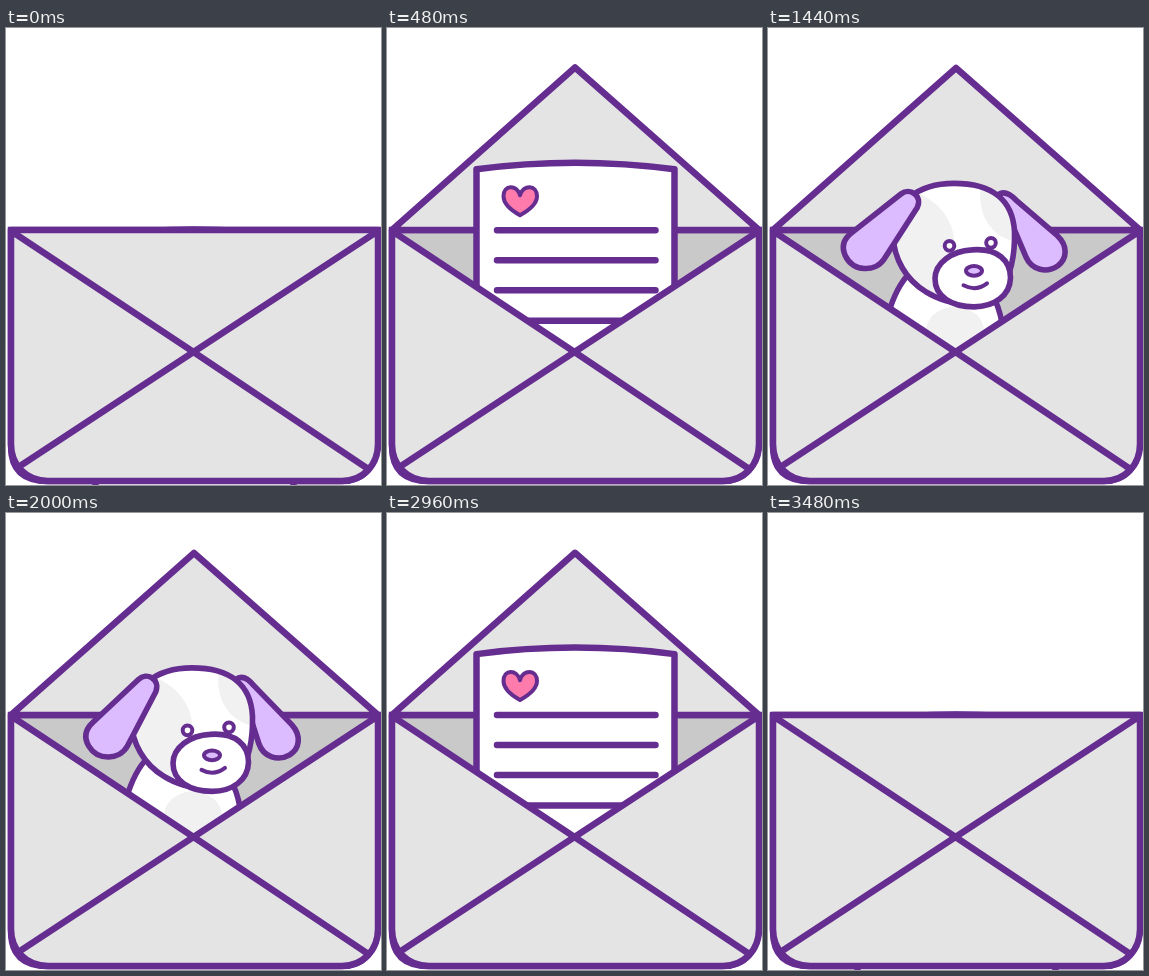
Animation of 375 by 457 pixels, one loop 3520 ms. Source, as an HTML page:

```html
<!DOCTYPE html>
<html lang="en">
<head>
<meta charset="utf-8">
<title>Letter and puppy</title>
<style>
  html, body { margin: 0; width: 100%; height: 100%; overflow: hidden; background: #fff; }
  svg { display: block; width: 100%; height: 100%; }
  .line { stroke: #662d91; stroke-width: 6.5; stroke-linecap: round; stroke-linejoin: round; }
  .dog { stroke-width: 5.6; }
  .thin { stroke-width: 4; }
  .grey { fill: #e4e4e4; }
  .white { fill: #fff; }
  .patch { fill: #f1f1f1; }
  .lilac { fill: #dcbcff; }
  .none { fill: none; }
</style>
</head>
<body>
<svg viewBox="0 0 375 457">
  <defs>
    <path id="headShape" d="M186 154.500C224 154.500 245 171 246.500 203C247 222 244 244 233 262L204 276C188 275 172 272 158 263C138 251 126 230 125 207C124 174 150 154.500 186 154.500Z"/>
    <path id="bodyShape" d="M108 350C115 300 122 264 142 244L224 266C233 280 237 300 238 350Z"/>
    <clipPath id="headClip"><use href="#headShape"/></clipPath>
    <clipPath id="bodyClip"><use href="#bodyShape"/></clipPath>
  </defs>
  <g id="scene">
    <path d="M5 202H372V418Q366 453 335 453H42Q5 453 5 418Z" fill="#c9c9c9" class="line" style="stroke-linejoin:miter"/>
    <path id="flap" class="line grey"/>
    <g id="letter">
      <path class="line white" d="M89.500 141Q188 128 287.500 141V400H89.500Z"/>
      <path class="line none" stroke-width="7" d="M110 202H268.500M110 232H268.500M110 262H268.500M110 292.500H268.500"/>
      <path class="line thin" fill="#ff7bac" d="M133 187C124 182 116.500 176 116.500 168C116.500 156 130 156 133 167C136 156 150 156 150 168C150 176 142 182 133 187Z"/>
    </g>
    <g id="dog">
      <use href="#bodyShape" class="line dog white"/>
      <ellipse class="patch" cx="187" cy="302" rx="29" ry="24" clip-path="url(#bodyClip)"/>
      <path id="earR" class="line dog lilac" d="M229 167C235 161 242 165 248 171L290 206C301 216 300 229 291 236C280 244 265 241 259 228L243 192Z"/>
      <use href="#headShape" class="white"/>
      <g class="patch" clip-path="url(#headClip)">
        <path d="M120 150L146 163C170 171 188 193 186 217L164 250L172 280H110Z"/>
        <path d="M214 150C208 178 216 206 250 214V150Z"/>
      </g>
      <use href="#headShape" class="line dog none"/>
      <path class="line dog white" d="M204 221C230 219 242.500 232 242.500 249C242 267 226 278 206 278C184 278 167 268 167 250C167 234 184 222 204 221Z"/>
      <g class="line thin white">
        <circle cx="181.500" cy="217" r="4.800"/>
        <circle cx="223" cy="214" r="4.800"/>
        <ellipse class="lilac" cx="206" cy="242" rx="8" ry="4.800"/>
        <path class="none" d="M195.500 256.500Q208 263 219 254.500"/>
      </g>
      <path id="earL" class="line dog lilac" d="M133 165C142 158 155 167 149 179L115 230C106 243 84 242 76.500 226C72 216 75 209 83 203Z"/>
    </g>
    <path class="line grey" d="M5 203L187.500 324L372 203V416C372 437 357 453 336 453H42C20 453 5 437 5 416Z"/>
    <path class="line none" d="M187.500 324L360 439.500M187.500 324L14 438"/>
  </g>
</svg>
<script>
const LOOP = 3520, STEP = 40;
const [scene, flap, letter, dog, earL, earR] =
  ["scene", "flap", "letter", "dog", "earL", "earR"].map(id => document.getElementById(id));

const clamp = x => Math.min(1, Math.max(0, x));
const expoOut = t => t >= 1 ? 1 : 1 - 2 ** (-10 * t);

// Plays forward from a to b, holds, then backward from c to d.
const there = (t, a, b, c, d) => clamp(t < (b + c) / 2 ? (t - a) / (b - a) : (d - t) / (d - c));

function drawFlap(open) {
  const HINGE = 202, LENGTH = 162, VIEW = 660;
  const tilt = Math.PI * (1 - open);
  const apex = HINGE - LENGTH * Math.cos(tilt) / (1 - LENGTH * Math.sin(tilt) / VIEW);
  flap.setAttribute("d", `M5 ${HINGE}L188 ${apex.toFixed(2)}L372 ${HINGE}Z`);
  scene.insertBefore(flap, open < 0.5 ? dog : letter);
}

function drawDog(t) {
  const droop = 5 * (1 - Math.cos(3 * Math.PI * t));
  dog.setAttribute("visibility", t > 0 ? "visible" : "hidden");
  dog.setAttribute("transform", `translate(0 ${136 * (1 - expoOut(t))})`);
  earL.setAttribute("transform", `rotate(${-droop} 143 171)`);
  earR.setAttribute("transform", `rotate(${droop} 236 171)`);
}

function render(ms) {
  const t = Math.floor(ms % LOOP / STEP) * STEP;
  const open = expoOut(there(t, 40, 600, 2920, 3480));
  const peek = there(t, 1000, 1600, 1920, 2480);
  drawFlap(open);
  letter.setAttribute("transform", `translate(0 ${67 * (1 - open) - (peek > 0 ? 4 : 0)})`);
  letter.setAttribute("visibility", peek < 0.1 ? "visible" : "hidden");
  drawDog(peek);
}

const start = performance.now();
function tick() {
  render(performance.now() - start);
  requestAnimationFrame(tick);
}
tick();
</script>
</body>
</html>
```
